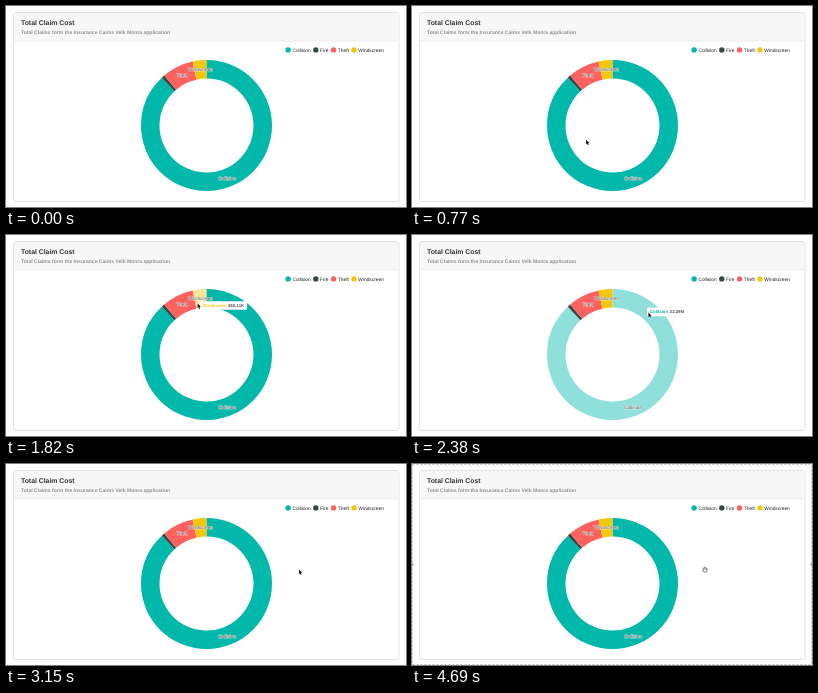
Recreate the animation shown at these times as an HTML page with a canvas. Size 400 by 201 pixels, loop 5.32 s.

```html
<!DOCTYPE html>
<html lang="en">
<head>
<meta charset="utf-8">
<title>Total Claim Cost</title>
<style>
html, body { margin: 0; width: 100%; height: 100%; overflow: hidden; background: #fff; }
canvas { display: block; width: 400px; height: 201px; }
</style>
</head>
<body>
<canvas id="stage"></canvas>
<script>
const W = 400, H = 201, LOOP = 5320, STEP = 70;
const SELECT_AT = 4620, ENTER_AT = 70;
const FONT = '"Liberation Sans", Arial, sans-serif';
const canvas = document.getElementById('stage');
const ctx = canvas.getContext('2d');
const dpr = window.devicePixelRatio || 1;
canvas.width = W * dpr;
canvas.height = H * dpr;

const ring = { x: 200.5, y: 119.6, outer: 65.5, inner: 47 };
const slices = [
  { name: 'Collision', value: 22.29, label: '22.29M', color: '#01b8aa' },
  { name: 'Fire', value: 0.19, label: '190.00K', color: '#374649' },
  { name: 'Theft', value: 1.97, label: '1.97M', color: '#fd625e' },
  { name: 'Windscreen', value: 0.86, label: '860.11K', color: '#f2c80f' }
];
const total = slices.reduce((sum, s) => sum + s.value, 0);
let turn = 0;
for (const s of slices) {
  s.from = turn;
  s.to = turn += s.value / total * Math.PI * 2;
}

// The pointer glides to each stop and rests until the next move
const entry = { x: 170, y: 182 };
const moves = [
  { start: 70, end: 210, x: 175.8, y: 177.3 },
  { start: 350, end: 1300, x: 171.8, y: 72 },
  { start: 1630, end: 1760, x: 191.6, y: 68.5 },
  { start: 1960, end: 3150, x: 293, y: 105.5, via: { x: 262, y: 78 } }
];

const clamp = v => Math.max(0, Math.min(1, v));
const smooth = k => k * k * (3 - 2 * k);
const lerp = (a, b, k) => ({ x: a.x + (b.x - a.x) * k, y: a.y + (b.y - a.y) * k });

function pointer(t) {
  let p = entry;
  for (const m of moves) {
    if (t < m.start) break;
    const k = clamp((t - m.start) / (m.end - m.start));
    p = m.via ? lerp(lerp(p, m.via, k), lerp(m.via, m, k), k) : lerp(p, m, smooth(k));
  }
  return p;
}

function sliceAt(t) {
  const p = pointer(t), dx = p.x - ring.x, dy = p.y - ring.y;
  const r = Math.hypot(dx, dy);
  if (r < ring.inner || r > ring.outer) return undefined;
  const a = (Math.atan2(dx, -dy) + Math.PI * 2) % (Math.PI * 2);
  return slices.find(s => a >= s.from && a < s.to);
}

// Moments from t back over the given span
const recent = (t, span) => Array.from({ length: 9 }, (_, i) => t - span * i / 8);
const mean = list => list.reduce((a, b) => a + b, 0) / list.length;

function setFont(size, bold) {
  ctx.font = `${bold ? 'bold ' : ''}${size}px ${FONT}`;
}

function text(str, x, y, size, color, bold) {
  setFont(size, bold);
  ctx.fillStyle = color;
  ctx.fillText(str, x, y);
  return ctx.measureText(str).width;
}

function box(x, y, w, h, r, fill, stroke) {
  ctx.beginPath();
  ctx.roundRect(x, y, w, h, r);
  ctx.fillStyle = fill;
  ctx.fill();
  if (stroke) {
    ctx.strokeStyle = stroke;
    ctx.lineWidth = 0.8;
    ctx.stroke();
  }
}

function drawCard() {
  ctx.fillStyle = '#fff';
  ctx.fillRect(0, 0, W, H);
  box(7.5, 6.5, 385.5, 189, 2.5, '#fff', '#dcdcdc');
  box(7.9, 6.9, 384.7, 28, [2.2, 2.2, 0, 0], '#f7f7f7');
  ctx.fillStyle = '#e3e3e3';
  ctx.fillRect(7.9, 34.7, 384.7, 0.6);
  text('Total Claim Cost', 15, 19.4, 6.85, '#2f3336', true);
  text('Total Claims form the Insurance Caims Velk Monra application', 15, 27.7, 5.06, '#8b9196', true);
}

function drawLegend() {
  let x = 282.1;
  for (const s of slices) {
    ctx.beginPath();
    ctx.arc(x, 43.9, 2.7, 0, Math.PI * 2);
    ctx.fillStyle = s.color;
    ctx.fill();
    x += 4.3;
    x += text(s.name, x, 45.6, 4.85, '#222') + 5.1;
  }
}

function drawRing(t) {
  const top = -Math.PI / 2;
  const hovered = recent(t, 70).map(sliceAt);
  for (const s of slices) {
    const glow = mean(hovered.map(h => h === s ? 1 : 0));
    ctx.beginPath();
    ctx.arc(ring.x, ring.y, ring.outer, top + s.from, top + s.to);
    ctx.arc(ring.x, ring.y, ring.inner, top + s.to, top + s.from, true);
    ctx.globalAlpha = 1 - 0.56 * glow;
    ctx.fillStyle = s.color;
    ctx.fill();
  }
  ctx.globalAlpha = 1;
}

function drawLabels() {
  const r = (ring.outer + ring.inner) / 2;
  ctx.textAlign = 'center';
  ctx.lineJoin = 'round';
  for (const s of slices) {
    if (s.value / total < 0.02) continue;
    const mid = (s.from + s.to) / 2;
    const x = ring.x + r * Math.sin(mid), y = ring.y - r * Math.cos(mid) + 1.6;
    setFont(4.74);
    ctx.strokeStyle = 'rgba(255,255,255,.75)';
    ctx.lineWidth = 0.85;
    ctx.strokeText(s.name, x, y);
    text(s.name, x, y, 4.74, '#555');
  }
  ctx.textAlign = 'left';
}

function drawTooltip(t) {
  const s = recent(t, 100).map(sliceAt).find(Boolean);
  if (!s) return;
  // The box trails the pointer by the mean of its latest positions
  const trail = recent(t, 150).map(pointer);
  const x = mean(trail.map(p => p.x)) + 6, y = mean(trail.map(p => p.y)) - 3;
  const size = 4.27, pad = 3;
  setFont(size, true);
  const nameWidth = ctx.measureText(s.name).width + 1.7;
  const width = nameWidth + ctx.measureText(s.label).width + pad * 2;
  ctx.shadowColor = 'rgba(0,0,0,.12)';
  ctx.shadowBlur = dpr;
  box(x, y, width, 8.6, 1, '#fff');
  ctx.shadowColor = 'transparent';
  text(s.name, x + pad, y + 5.8, size, s.color, true);
  text(s.label, x + pad + nameWidth, y + 5.8, size, '#555', true);
}

function drawArrow({ x, y }) {
  const outline = [[0, 0], [0, 4.6], [1, 3.7], [1.8, 5.4], [2.6, 5], [1.9, 3.4], [3.2, 3.3]];
  ctx.beginPath();
  for (const [dx, dy] of outline) ctx.lineTo(x + dx, y + dy);
  ctx.closePath();
  ctx.strokeStyle = '#fff';
  ctx.lineWidth = 0.8;
  ctx.stroke();
  ctx.fillStyle = '#111';
  ctx.fill();
}

function drawHand({ x, y }) {
  ctx.beginPath();
  ctx.ellipse(x, y + 0.4, 2.1, 2.4, 0, 0, Math.PI * 2);
  ctx.fillStyle = '#fff';
  ctx.fill();
  ctx.strokeStyle = '#555';
  ctx.lineWidth = 0.8;
  ctx.stroke();
  ctx.lineWidth = 0.4;
  ctx.beginPath();
  for (let i = -1; i <= 1; i++) {
    ctx.moveTo(x + i * 0.9, y - 1.4);
    ctx.lineTo(x + i * 0.9, y + 0.4);
  }
  ctx.stroke();
}

function drawSelection() {
  ctx.strokeStyle = '#aaa';
  ctx.lineWidth = 0.7;
  ctx.setLineDash([2, 2]);
  ctx.strokeRect(0.5, 0.5, W - 1, H - 1);
  ctx.setLineDash([]);
  ctx.fillStyle = '#888';
  for (const x of [0, W - 1.5]) ctx.fillRect(x, H / 2 - 0.8, 1.5, 1.5);
}

function draw(now) {
  const t = Math.floor(now % LOOP / STEP) * STEP;
  ctx.setTransform(dpr, 0, 0, dpr, 0, 0);
  ctx.textRendering = 'geometricPrecision';
  drawCard();
  drawLegend();
  drawRing(t);
  drawLabels();
  drawTooltip(t);
  if (t >= SELECT_AT) {
    drawSelection();
    drawHand(pointer(t));
  } else if (t >= ENTER_AT) {
    drawArrow(pointer(t));
  }
}

const start = performance.now();
function tick() {
  draw(performance.now() - start);
  requestAnimationFrame(tick);
}
tick();
</script>
</body>
</html>
```
